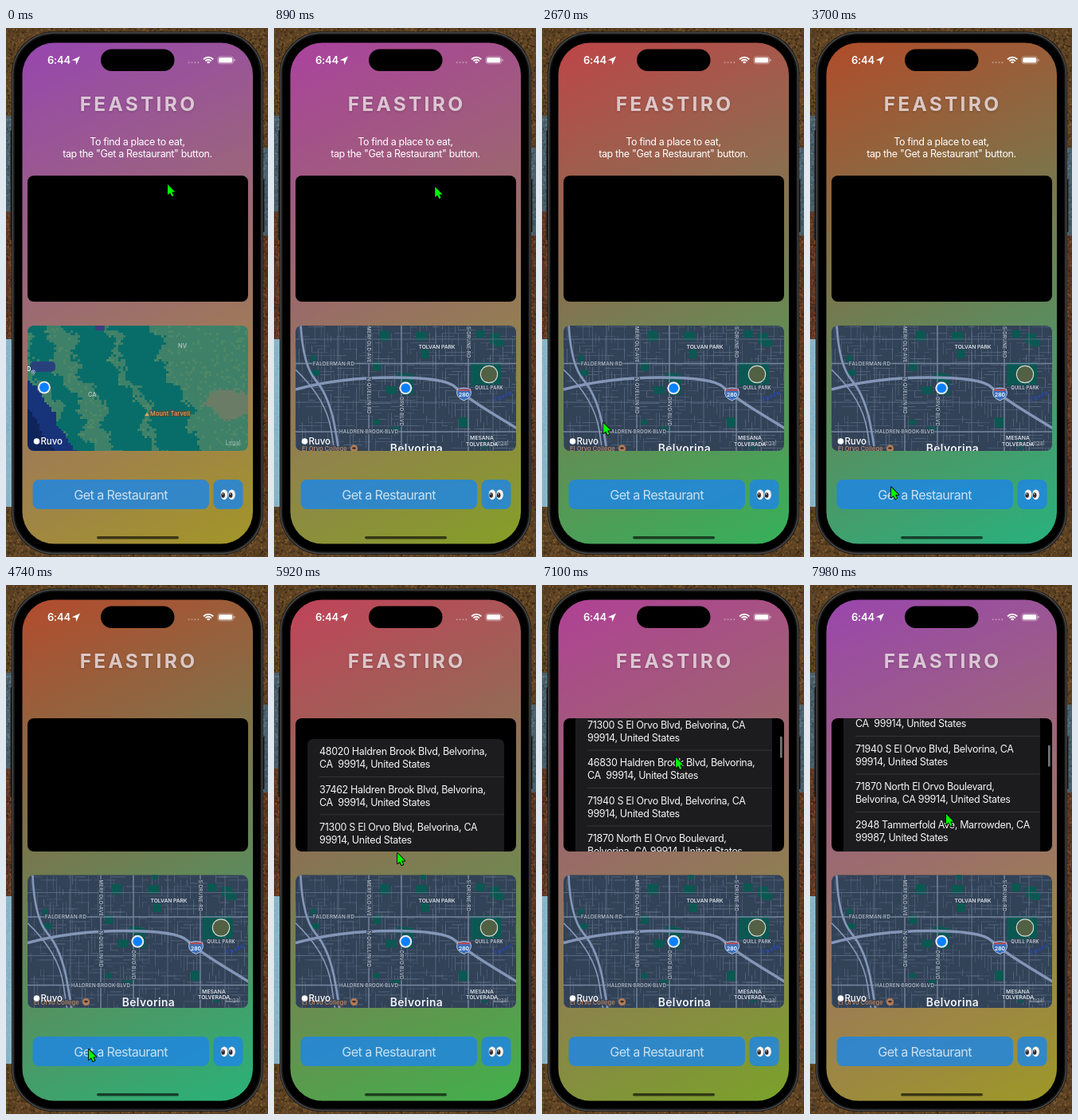
An HTML page with a canvas for the animation above (8000 ms loop, 329 by 663 pixels).

```html
<!DOCTYPE html>
<html lang="en">
<head>
<meta charset="utf-8">
<title>Restaurant finder</title>
<style>
  html, body { margin: 0; width: 100%; height: 100%; overflow: hidden; background: #1c1712; }
  canvas { display: block; width: 329px; height: 663px; }
</style>
</head>
<body>
<canvas id="stage"></canvas>
<script>
const W = 329, H = 663, LOOP = 8000, STEP = 147.75;
const canvas = document.getElementById('stage');
const ctx = canvas.getContext('2d');
const ratio = window.devicePixelRatio || 1;
canvas.width = W * ratio;
canvas.height = H * ratio;
ctx.scale(ratio, ratio);

const SANS = 'Inter, Roboto, sans-serif';
const MAP_SWITCH = 3 * STEP, TAP = 29 * STEP, LIST_IN = 36 * STEP;
const SCROLL_START = 6200, SCROLL_TIME = 1460, SCROLL_BY = 193;

// Where the pointer rests or turns: time, x, y.
const POINTER = [
  [0, 203, 196], [1300, 202, 200], [2670, 77, 495], [3900, 104, 582],
  [5150, 104, 582], [5920, 155, 336], [7100, 168, 216], [7980, 171, 287]
];

const ROWS = [
  ['48020 Haldren Brook Blvd, Belvorina,', 'CA  99914, United States'],
  ['37462 Haldren Brook Blvd, Belvorina,', 'CA  99914, United States'],
  ['71300 S El Orvo Blvd, Belvorina, CA', '99914, United States'],
  ['46830 Haldren Brook Blvd, Belvorina,', 'CA  99914, United States'],
  ['71940 S El Orvo Blvd, Belvorina, CA', '99914, United States'],
  ['71870 North El Orvo Boulevard,', 'Belvorina, CA 99914, United States'],
  ['2948 Tammerfold Ave, Marrowden, CA', '99987, United States']
];

const clamp = u => Math.min(1, Math.max(0, u));
const smooth = u => u * u * (3 - 2 * u);

function seeded(seed) {
  return () => (seed = (seed * 16807) % 2147483647) / 2147483647;
}

// Turns the hue while keeping the luminance.
function turnHue([r, g, b], angle) {
  const luma = 0.213 * r + 0.715 * g + 0.072 * b;
  const c = Math.cos(angle), s = Math.sin(angle);
  const red = luma + (r - luma) * c + (b - luma) * s;
  const blue = luma + (b - luma) * c - (r - luma) * s;
  const green = (luma - 0.213 * red - 0.072 * blue) / 0.715;
  return `rgb(${red}, ${green}, ${blue})`;
}

function box(x, y, x2, y2, r, fill) {
  ctx.beginPath();
  ctx.roundRect(x, y, x2 - x, y2 - y, r);
  if (fill) { ctx.fillStyle = fill; ctx.fill(); }
}

function oval(x, y, rx, ry, fill) {
  ctx.beginPath();
  ctx.ellipse(x, y, rx, ry, 0, 0, Math.PI * 2);
  ctx.fillStyle = fill;
  ctx.fill();
}

const disc = (x, y, r, fill) => oval(x, y, r, r, fill);

function outline(width, colour) {
  ctx.lineWidth = width;
  ctx.strokeStyle = colour;
  ctx.stroke();
}

function shape(points, fill) {
  ctx.beginPath();
  for (const p of points) ctx.lineTo(...p);
  ctx.closePath();
  ctx.fillStyle = fill;
  ctx.fill();
}

// A line whose corners are rounded through the midpoints.
function road(points, width, colour) {
  const last = points.length - 1;
  ctx.beginPath();
  ctx.moveTo(...points[0]);
  for (let i = 1; i < last; i++) {
    const [x, y] = points[i], [nx, ny] = points[i + 1];
    ctx.quadraticCurveTo(x, y, (x + nx) / 2, (y + ny) / 2);
  }
  ctx.lineTo(...points[last]);
  outline(width, colour);
}

function text(str, x, y, size, { colour = '#fff', weight = 400, gap = 0, align = 'left', halo, turn = 0 } = {}) {
  ctx.save();
  ctx.translate(x, y);
  ctx.rotate(turn);
  ctx.font = `${weight} ${size}px ${SANS}`;
  ctx.letterSpacing = gap + 'px';
  ctx.textAlign = align;
  if (halo) {
    ctx.lineWidth = 2;
    ctx.lineJoin = 'round';
    ctx.strokeStyle = halo;
    ctx.strokeText(str, 0, 0);
  }
  ctx.fillStyle = colour;
  ctx.fillText(str, 0, 0);
  ctx.restore();
}

function wallpaper() {
  const rand = seeded(71);
  const bark = [32, 45, 25], stone = [200, 18, 36], rust = [22, 45, 25], water = [198, 38, 66];
  function patch(x, y, w, h, [hue, sat, light], spread = 22) {
    ctx.fillStyle = `hsl(${hue} ${sat}% ${light}%)`;
    ctx.fillRect(x, y, w, h);
    for (let i = 0; i < w * h / 6; i++) {
      ctx.fillStyle = `hsl(${hue} ${sat}% ${light + (rand() - 0.5) * spread}%)`;
      ctx.fillRect(x + rand() * (w - 2), y + rand() * (h - 2), 2, 2);
    }
  }
  patch(0, 0, W, H, bark);
  patch(0, 110, 20, 120, stone);
  patch(0, 230, 20, 160, rust);
  patch(0, 390, 20, 210, water, 6);
  patch(310, 150, 19, 110, stone);
  patch(310, 260, 19, 340, rust);
}

function phone() {
  box(5.5, 128, 8, 266, 1, '#191919');
  box(322, 190, 324.5, 256, 1, '#191919');
  box(7, 4.5, 323, 660, 53, '#161616');
  box(8.5, 6, 321.5, 658.5, 52);
  outline(1.4, '#4a4a4b');
  box(11, 8.5, 319, 656, 49, '#000');
}

function screen(t) {
  const degrees = -11 + 46 * Math.cos(0.7 * (t / 1000 - 4.1));
  const angle = degrees * Math.PI / 180;
  const g = ctx.createLinearGradient(20, 18, 310, 647);
  g.addColorStop(0, turnHue([193, 66, 95], angle));
  g.addColorStop(1, turnHue([68, 175, 71], angle));
  box(20.5, 18.5, 310, 646.5, 40, g);
}

function statusBar() {
  text('6:44', 52, 45, 13, { weight: 600, gap: -0.2 });
  shape([[93, 35.5], [88.3, 46], [87.6, 41], [82.7, 40.2]], '#fff');
  box(119, 26.5, 211.5, 54, 14, '#000');
  for (let i = 0; i < 4; i++) disc(229.6 + i * 3.9, 43.3, 1, 'rgba(255,255,255,.4)');
  for (const r of [2, 5.2, 8.4]) {
    ctx.beginPath();
    ctx.arc(254.2, 45, r, -Math.PI * 0.76, -Math.PI * 0.24);
    outline(1.9, '#fff');
  }
  box(266, 35.8, 285.5, 44.8, 2.8);
  outline(0.8, 'rgba(255,255,255,.5)');
  box(267.2, 37, 284.3, 43.6, 1.9, '#fff');
  box(286.4, 38.8, 287.5, 41.8, 0.6, 'rgba(255,255,255,.6)');
}

function heading(tapped) {
  ctx.save();
  ctx.shadowColor = 'rgba(0,0,0,.25)';
  ctx.shadowBlur = 3;
  ctx.shadowOffsetY = 1;
  text('FEASTIRO', 166.5, 104, 24.5, { weight: 700, gap: 3.3, align: 'center', colour: 'rgba(238,226,230,.82)' });
  ctx.restore();
  if (tapped) return;
  const style = { gap: -0.35, align: 'center' };
  text('To find a place to eat,', 165, 147, 12.5, style);
  text('tap the "Get a Restaurant" button.', 165, 161.5, 12.5, style);
}

function addressList(t) {
  const offset = SCROLL_BY * smooth(clamp((t - SCROLL_START) / SCROLL_TIME));
  const top = 193 - offset, pitch = 47.4;
  box(42, top, 289, top + 800, 7, '#1c1c1e');
  ROWS.forEach((lines, i) => {
    const y = top + i * pitch;
    ctx.fillStyle = '#3a3a3d';
    if (i) ctx.fillRect(57, y - 0.4, 232, 0.8);
    lines.forEach((line, j) => text(line, 57, y + 20.2 + j * 16, 12.5, { gap: -0.32, colour: '#f4f4f4' }));
  });
  if (offset > 0) {
    const y = 168 + offset * 0.17;
    box(299, y, 301.6, y + 27, 1.3, '#77777a');
  }
}

function resultBox(t, tapped) {
  ctx.save();
  box(27, tapped ? 167 : 185, 304, tapped ? 334 : 343, 8, '#000');
  ctx.clip();
  if (t >= LIST_IN) addressList(t);
  ctx.restore();
}

function locationDot(x, y) {
  disc(x, y, 8.6, 'rgba(10,20,40,.35)');
  disc(x, y, 8, '#e6e9ee');
  disc(x, y, 5.9, '#0a80ff');
}

// Valleys and ranges run in slanted, ragged bands inland from the coast.
function land(x, y, noise) {
  const rough = 7 * Math.sin(y / 13) + 5 * Math.sin(x / 9 + y / 6) + noise * 9;
  const inland = x - 0.45 * (y - 373) + rough;
  const shore = x - 27 - 0.65 * (y - 436) + rough * 0.3;
  if (shore < -26) return '#0f2459';
  if (shore < 0) return '#17337a';
  const inBand = (middle, half) => Math.abs(inland - middle) < half;
  if (inBand(94, 23) || inBand(153, 25) || inBand(28, 13)) return '#086d69';
  if (Math.hypot(x - 283, (y - 470) * 1.4) + rough < 24) return '#6b7c66';
  return noise > 0.36 ? '#4d8765' : '#3f8069';
}

function terrainMap() {
  const rand = seeded(33), cell = 3;
  for (let y = 373; y < 530; y += cell) {
    for (let x = 27; x < 304; x += cell) {
      ctx.fillStyle = land(x, y, rand() - 0.5);
      ctx.fillRect(x, y, cell, cell);
    }
  }
  box(30, 418, 62, 431, 5, '#28417c');
  box(112, 371, 124, 379, 2, '#3a3f80');
  text('NV', 216, 401, 7.5, { weight: 500, colour: '#b8ccc4' });
  text('CA', 103, 461.5, 7.5, { weight: 500, colour: '#b8ccc4' });
  shape([[174.5, 486], [177, 481.5], [179.5, 486]], '#f0a35d');
  text('Mount Tarvell', 181, 486, 7.4, { weight: 500, gap: 0.15, colour: '#eca160', halo: '#4a4a35' });
  text('D', 26, 430, 7.5, { weight: 600 });
  disc(34.3, 431, 2.4, '#cfd9e6');
  disc(34.3, 431, 1.7, '#28417c');
  disc(34.3, 431, 0.8, '#fff');
  locationDot(48, 450.5);
}

function blocks() {
  const rand = seeded(907);
  for (let i = 0; i < 620; i++) {
    const x = 27 + Math.round(rand() * 69) * 4, y = 362 + Math.round(rand() * 44) * 4;
    const len = 6 + rand() * 20;
    ctx.fillStyle = i % 3 ? '#4b5b72' : '#58687f';
    if (i % 2) ctx.fillRect(x, y, len, 0.8);
    else ctx.fillRect(x, y, 0.8, len);
  }
  ctx.fillStyle = '#0b5852';
  for (let i = 0; i < 16; i++) {
    ctx.fillRect(27 + rand() * 270, 365 + rand() * 155, 6 + rand() * 9, 6 + rand() * 8);
  }
  ctx.fillRect(247, 419, 38, 30);
  ctx.fillRect(160, 434, 15, 26);
}

function shield(x, y) {
  ctx.beginPath();
  ctx.moveTo(x - 8, y - 6);
  ctx.quadraticCurveTo(x, y - 9, x + 8, y - 6);
  ctx.quadraticCurveTo(x + 12, y + 4, x, y + 8.5);
  ctx.quadraticCurveTo(x - 12, y + 4, x - 8, y - 6);
  ctx.fillStyle = '#3b70bb';
  ctx.fill();
  outline(0.9, '#c9d3e4');
  ctx.fillStyle = '#b54d51';
  ctx.fillRect(x - 7.5, y - 6, 15, 2.3);
  text('280', x, y + 3.6, 6.8, { weight: 600, align: 'center' });
}

function roads() {
  const main = '#77869f', minor = '#64738a', freeway = '#8496b8';
  const across = (y, width, colour) => road([[27, y], [304, y]], width, colour);
  const along = (x, width, colour) => road([[x, 355], [x, 545]], width, colour);
  for (const y of [390, 469]) across(y, 0.8, minor);
  for (const x of [81, 203, 275]) along(x, 0.8, minor);
  for (const y of [420.5, 506]) across(y, 1.4, main);
  for (const x of [119, 160, 244]) along(x, 1.4, main);
  road([[33, 355], [34, 420], [70, 462], [84, 545]], 2.7, freeway);
  road([[27, 428], [66, 465], [78, 545]], 1.7, freeway);
  road([[27, 453], [83, 438], [215, 438], [240, 462], [310, 505]], 3.4, freeway);
}

function streetMap(shift) {
  const ground = '#324257';
  ctx.save();
  ctx.translate(0, shift);
  ctx.fillStyle = ground;
  ctx.fillRect(27, 355, 277, 190);
  blocks();
  roads();

  const street = { weight: 500, colour: '#c3cad4', halo: ground, gap: 0.35 };
  const down = { ...street, turn: Math.PI / 2 };
  text('FALDERMAN RD', 49, 422.8, 6.2, street);
  text('HALDREN BROOK BLVD', 82, 508.3, 6.2, { ...street, gap: 0.2 });
  text('MERFOLD AVE', 117, 374, 6, down);
  text('N QUELLIN RD', 117, 438, 6, down);
  text('ORVO BLVD', 158, 462, 6, down);
  text('S DRUNE RD', 242, 374, 6, down);

  const place = { weight: 600, colour: '#d9dfe6', halo: ground, align: 'center' };
  text('TOLVAN PARK', 204.5, 402, 6.8, { ...place, gap: -0.1 });
  text('MESANA', 261, 516, 6.8, place);
  text('TOLVERADA', 261, 523.5, 6.8, { ...place, gap: -0.1 });
  text('Belvorina', 179, 532, 13.8, { ...place, colour: '#f2f4f7', gap: 0.4 });
  text('Tavro', 277, 469, 8, { weight: 600, colour: '#2849bd', turn: -0.42, gap: 0.8 });

  disc(270, 434, 11.2, '#d5d9d2');
  disc(270, 434, 10.1, '#526044');
  text('QUILL PARK', 270, 453, 5.8, { ...place, weight: 500, gap: 0.2 });
  shield(238.5, 458.5);
  text('El Orvo College', 35, 530, 7.5, { weight: 500, colour: '#c88a62', halo: ground, gap: 0.1 });
  disc(100.5, 527, 4.6, '#b97c55');
  shape([[97.3, 526.6], [100.5, 525], [103.7, 526.6], [100.5, 528.2]], '#39302d');
  locationDot(165.3, 451.3);
  ctx.restore();
}

function mapBox(t, tapped) {
  ctx.save();
  box(27, tapped ? 363.5 : 373, 304, 530, 8);
  ctx.clip();
  if (t < MAP_SWITCH) terrainMap();
  else streetMap(tapped ? -4.5 : 0);
  disc(38.5, 518, 3.8, '#fff');
  text('Ruvo', 43.5, 522, 11.5, { weight: 500, gap: -0.1 });
  text('Legal', 275.5, 521.5, 7, { colour: 'rgba(225,230,235,.6)', gap: 0.2 });
  ctx.fillStyle = 'rgba(225,230,235,.5)';
  ctx.fillRect(275.5, 522.5, 18.5, 0.6);
  ctx.restore();
}

function eye(x) {
  oval(x, 584.8, 4.4, 6.4, '#f3f2f1');
  oval(x - 1.4, 585.5, 2.3, 3.3, '#352a2a');
  disc(x - 1.8, 584, 0.7, '#fff');
}

function buttons() {
  const blue = 'rgba(32,135,225,.85)';
  box(33.5, 566, 255, 603, 8, blue);
  box(260.5, 566, 297.5, 603, 8, blue);
  text('Get a Restaurant', 144, 591, 16.2, { gap: -0.6, align: 'center', colour: 'rgba(255,255,255,.74)' });
  eye(274);
  eye(283.5);
  box(114, 637, 217, 640.6, 1.8, 'rgba(0,0,0,.62)');
}

function pointerAt(t) {
  const next = POINTER.findIndex(key => key[0] > t);
  if (next < 0) return POINTER[POINTER.length - 1].slice(1);
  const [t0, x0, y0] = POINTER[next - 1], [t1, x1, y1] = POINTER[next];
  const u = smooth((t - t0) / (t1 - t0));
  return [x0 + (x1 - x0) * u, y0 + (y1 - y0) * u];
}

function pointer(t) {
  ctx.save();
  ctx.translate(...pointerAt(t));
  ctx.lineJoin = 'round';
  shape([[0, 0], [0, 13], [3, 10.4], [5.2, 15], [7.4, 14], [5.3, 9.6], [9.3, 9.4]], '#00f800');
  outline(1.8, '#000');
  ctx.fill();
  ctx.restore();
}

function draw(t) {
  const tapped = t >= TAP;
  wallpaper();
  phone();
  screen(t);
  statusBar();
  heading(tapped);
  resultBox(t, tapped);
  mapBox(t, tapped);
  buttons();
  pointer(t);
}

const begin = performance.now();
let shown = -1;

function tick() {
  const step = Math.floor(((performance.now() - begin) % LOOP) / STEP);
  if (step !== shown) {
    shown = step;
    draw(step * STEP);
  }
  requestAnimationFrame(tick);
}
tick();
</script>
</body>
</html>
```
